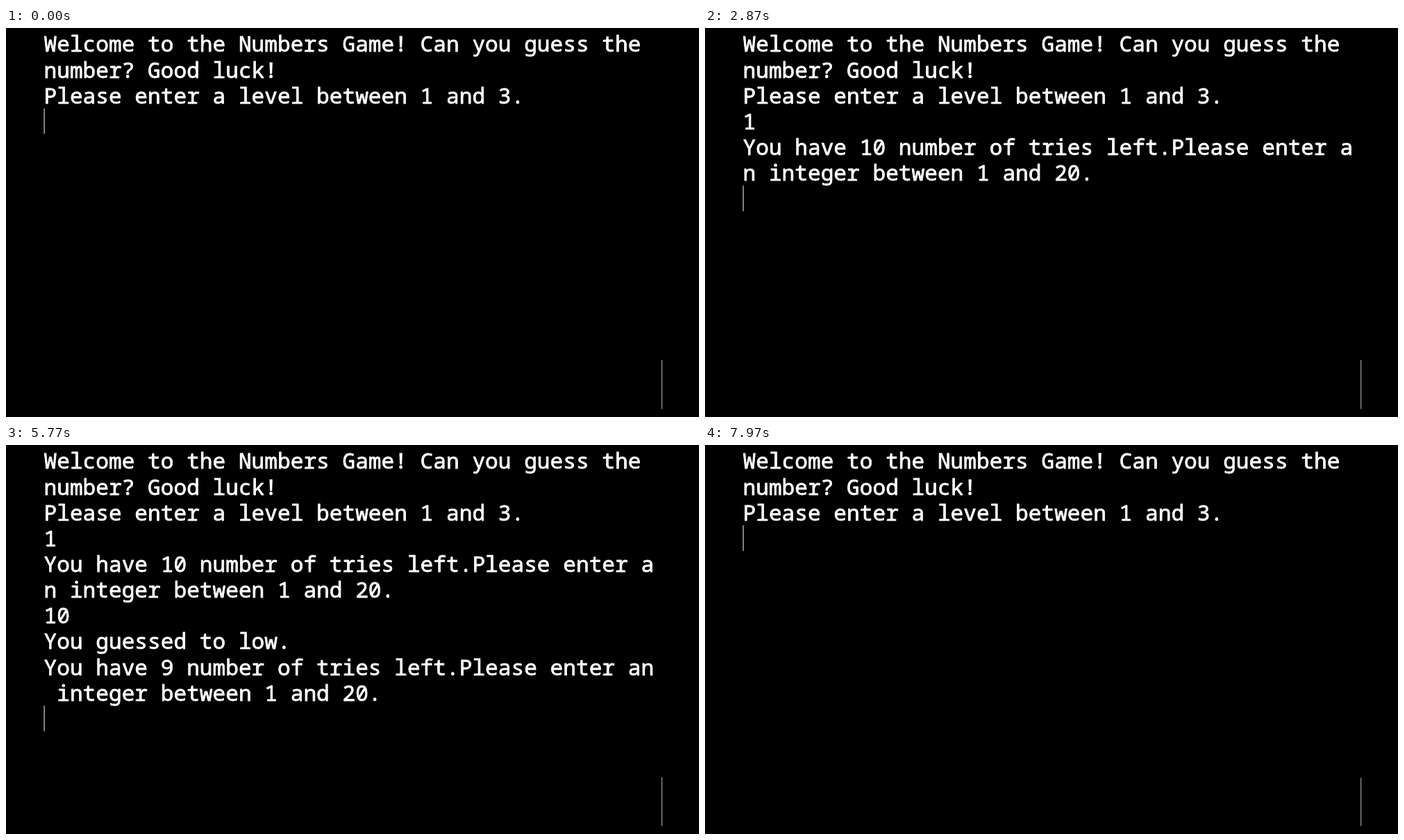
These frames come from a looping animation (998 by 561 pixels, 8 s). An HTML page:

```html
<!DOCTYPE html>
<html lang="en">
<head>
<meta charset="utf-8">
<title>Numbers Game</title>
<style>
  html, body { margin: 0; width: 100%; height: 100%; overflow: hidden; background: #000; }
  svg { display: block; width: 100%; height: 100%; }
  text {
    font: 500 31.17px "Noto Sans Mono", "DejaVu Sans Mono", monospace;
    font-variant-ligatures: none;
    fill: #fff;
    stroke: #fff;
    stroke-width: 0.8px;
    stroke-linejoin: round;
    white-space: pre;
  }
</style>
</head>
<body>
<svg viewBox="0 0 998 561">
  <rect width="998" height="561" fill="#000"/>
  <g id="rows"></g>
  <rect id="cursor" width="1.2" height="37" fill="#d0d0d0"/>
  <rect id="bar" x="944" width="1.2" fill="#a09c94"/>
</svg>
<script>
const LOOP = 8000, BLINK = 550;
const LEFT = 54.5, COL = 18.7, BASE = 34.4, PITCH = 37.15;
const ROWS = 14, RESTART = 7850;

const intro = "Welcome to the Numbers Game! Can you guess the\nnumber? Good luck!\n" +
  "Please enter a level between 1 and 3.\n";

// Each step: time, text added to the screen, optional clear first
const steps = [
  { at: -250, add: intro, clear: true },
  { at: 2200, add: "1" },
  { at: 2600, add: "\nYou have 10 number of tries left.Please enter a\nn integer between 1 and 20.\n" },
  { at: 3600, add: "1" },
  { at: 3800, add: "0" },
  { at: 4165, add: "\nYou guessed to low.\nYou have 9 number of tries left.Please enter an\n" +
    " integer between 1 and 20.\n" },
  { at: 5950, add: "1" },
  { at: 6100, add: "5" },
  { at: 6350, add: "\nCongratulations, you won.!\nDo you want to play again? (y/n).\n" },
  { at: 7600, add: "y" },
  { at: RESTART, add: intro, clear: true }
];

const byId = id => document.getElementById(id);
const cursor = byId("cursor"), bar = byId("bar");

const rows = Array.from({ length: ROWS }, (_, i) => {
  const row = document.createElementNS("http://www.w3.org/2000/svg", "text");
  row.setAttribute("x", LEFT);
  row.setAttribute("y", BASE + i * PITCH);
  byId("rows").append(row);
  return row;
});

function draw(t) {
  let screen = "", last = 0;
  for (const { at, add, clear } of steps) {
    if (at > t) break;
    screen = clear ? add : screen + add;
    last = at;
  }

  const lines = screen.split("\n");
  rows.forEach((row, i) => {
    const line = lines[i] || "";
    if (row.textContent !== line) row.textContent = line;
  });

  // Every key press restarts the blink with the cursor on
  const on = Math.floor((t - last) / BLINK) % 2 === 0;
  const end = lines.length - 1;
  cursor.setAttribute("x", LEFT + lines[end].length * COL);
  cursor.setAttribute("y", 4.4 + end * PITCH);
  cursor.setAttribute("visibility", on ? "visible" : "hidden");

  const top = t < RESTART ? 479 : 480;
  bar.setAttribute("y", top);
  bar.setAttribute("height", 549.5 - top);
}

const start = performance.now();
function tick() {
  draw((performance.now() - start) % LOOP);
  requestAnimationFrame(tick);
}
tick();
</script>
</body>
</html>
```
